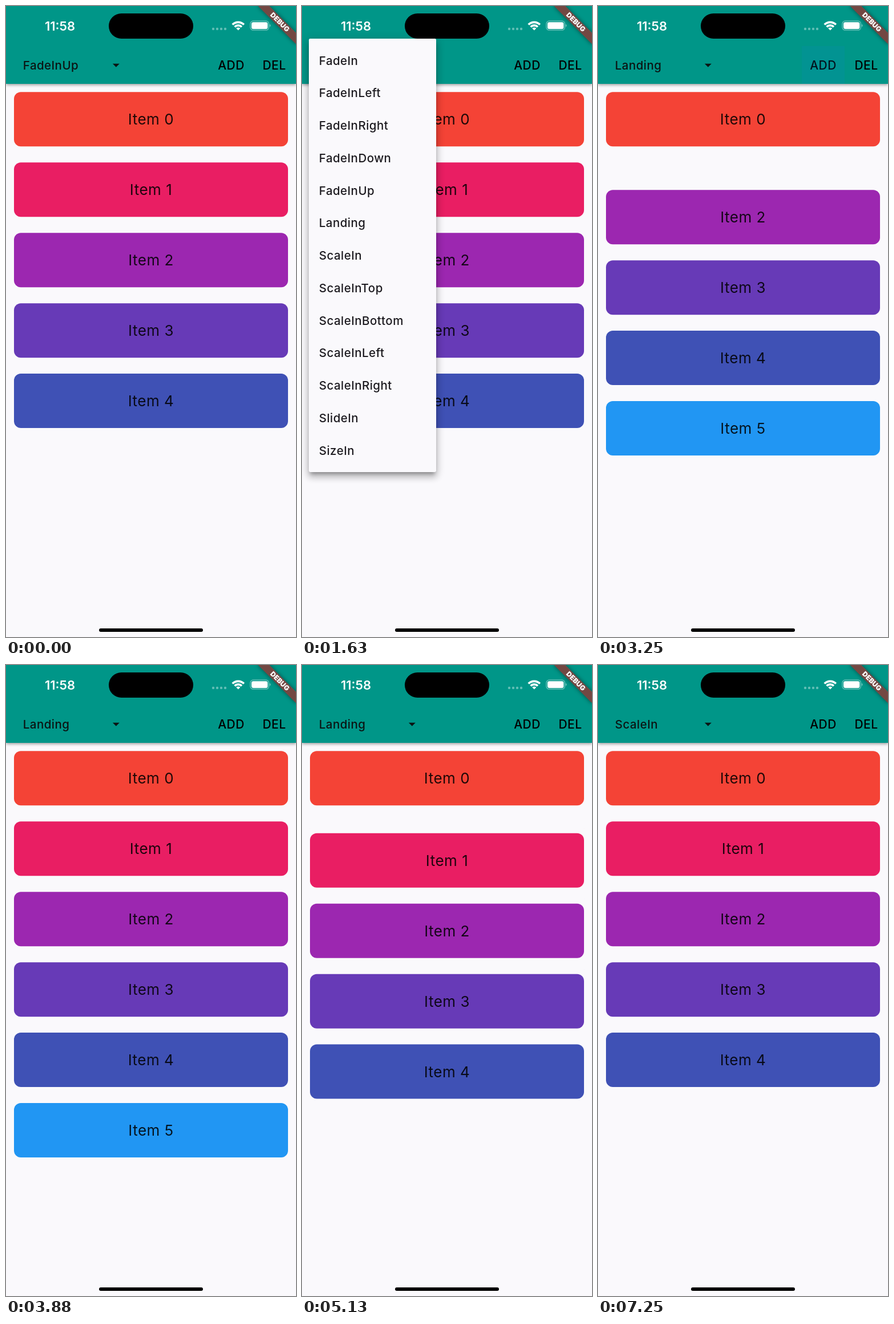
Write an HTML page that moves like this. It is 508 px wide and 1102 px high and loops after 8000 ms.

```html
<!DOCTYPE html>
<html lang="en">
<head>
<meta charset="utf-8">
<title>Animated list</title>
<style>
html, body { margin: 0; width: 100%; height: 100%; overflow: hidden; }
#stage {
  position: relative; width: 508px; height: 1102px; overflow: hidden;
  background: #faf9fc; color: rgba(0, 0, 0, .87);
  font-family: Inter, Roboto, sans-serif;
}
#stage div { position: absolute; box-sizing: border-box; white-space: nowrap; }

.card {
  left: 14.2px; top: 0; width: 479.6px; height: 94.5px; border-radius: 12px;
  font-size: 26px; letter-spacing: .5px; line-height: 95px; text-align: center;
}
#slot { left: 14.2px; top: 259px; width: 479.6px; height: 123px; overflow: hidden; }
#slot .card { left: 0; top: 14.2px; }

#bar {
  left: 0; top: 0; width: 508px; height: 136px; background: #009688;
  box-shadow: 0 2px 5px rgba(0, 0, 0, .38);
}
#label, .option { font-size: 20.5px; font-weight: 500; letter-spacing: .45px; }
#label { left: 29.8px; top: 84px; line-height: 40px; color: #0b1413; }
.button {
  top: 70px; height: 66px; line-height: 67px; text-align: center; color: #000;
  font-size: 21px; font-weight: 500; letter-spacing: .5px;
}
.ink { inset: 0; background: rgba(16, 130, 200, .15); }
#add { left: 357px; width: 75px; }
#del { left: 435px; width: 70px; }
#clock { left: 68px; top: 15px; line-height: 40px; font-size: 22px; font-weight: 600; color: #fff; }
#island { left: 180px; top: 13px; width: 148px; height: 44px; border-radius: 22px; background: #000; }
#stage svg { position: absolute; left: 0; top: 0; }
#home { left: 163px; top: 1086.5px; width: 182px; height: 6px; border-radius: 3px; background: #000; }

#menu { left: 11.8px; top: 56.5px; width: 223.4px; height: 757px; }
#panel {
  left: 0; width: 100%; border-radius: 2.4px; background: #faf9fc;
  box-shadow: 0 6px 6px -3px rgba(0, 0, 0, .26), 0 9px 12px 1px rgba(0, 0, 0, .17),
    0 3px 16px 2px rgba(0, 0, 0, .14);
}
.option {
  left: 0; width: 100%; height: 56.75px; padding-left: 18px;
  line-height: 57px; color: #1d1b20;
}

#banner {
  left: 460.7px; top: 33.1px; width: 94.6px; height: 14.2px;
  background: rgba(183, 28, 28, .63); box-shadow: 0 0 7px rgba(0, 0, 0, .5);
  color: #fff; font-size: 12px; font-weight: 900; line-height: 14.4px; text-align: center;
}
#corner { left: 508px; top: 0; width: 0; height: 0; transform: rotate(45deg); }
#corner #banner { left: -47.3px; }
</style>
</head>
<body>
<div id="stage">
  <div id="slot"></div>
  <div id="bar">
    <div id="label"></div>
    <div id="add" class="button"><div class="ink"></div>ADD</div>
    <div id="del" class="button"><div class="ink"></div>DEL</div>
    <div id="clock">11:58</div>
    <div id="island"></div>
    <svg width="508" height="136" fill="#fff">
      <path d="M186.8 100.8h12l-6 6z" fill="#0b1413"/>
      <path d="M363 40h24" stroke="#fff" stroke-opacity=".38" stroke-width="4.4"
        stroke-linecap="round" stroke-dasharray="0 7"/>
      <g fill="none" stroke="#fff" stroke-width="3.6">
        <path d="M396.7 32.5a14.2 14.2 0 0 1 20.1 0"/>
        <path d="M400.6 36.4a8.7 8.7 0 0 1 12.3 0"/>
      </g>
      <path d="M406.8 42.5l-3.6-3.5a5 5 0 0 1 7.2 0z"/>
      <rect x="428" y="26.2" width="32.4" height="16" rx="5" fill="none"
        stroke="#fff" stroke-opacity=".45" stroke-width="1.3"/>
      <rect x="430" y="28.2" width="28.4" height="12" rx="3.2"/>
      <path d="M462 31.6q3 2.6 0 5.2z" fill-opacity=".5"/>
    </svg>
  </div>
  <div id="menu"><div id="panel"></div></div>
  <div id="home"></div>
  <div id="corner"><div id="banner">DEBUG</div></div>
</div>
<script>
const LOOP = 8000, STEP = 125;   // the picture is held for each step
const TOP = 150.3, PITCH = 122.95, ROW = 56.75, PAD = 10.1, MENU_H = 757;
const colors = ['#f44336', '#e91e63', '#9c27b0', '#673ab7', '#3f51b5', '#2196f3'];
const names = ['FadeIn', 'FadeInLeft', 'FadeInRight', 'FadeInDown', 'FadeInUp', 'Landing', 'ScaleIn',
  'ScaleInTop', 'ScaleInBottom', 'ScaleInLeft', 'ScaleInRight', 'SlideIn', 'SizeIn'];

const insert = { start: 3133, grown: 3433, land: 3460, end: 3760 };
const remove = { start: 4575, gone: 4875, end: 5175 };
const menus = [
  { open: 1240, tap: 2375, close: 2450, from: 4, to: 5 },
  { open: 5615, tap: 7000, close: 7075, from: 5, to: 6 },
];

const $ = id => document.getElementById(id);
const ramp = (t, a, b) => Math.min(1, Math.max(0, (t - a) / (b - a)));
const mix = (a, b, p) => a + (b - a) * p;

function addDiv(parent, className, text, before = null) {
  const div = document.createElement('div');
  div.className = className;
  div.textContent = text;
  return parent.insertBefore(div, before);
}

function addCard(parent, i, before) {
  const card = addDiv(parent, 'card', 'Item ' + i, before);
  card.style.background = colors[i];
  return card;
}

const cards = colors.map((_, i) => addCard($('stage'), i, $('slot')));
const guest = addCard($('slot'), 1);
const options = names.map((name, i) => {
  const option = addDiv($('menu'), 'option', name);
  option.style.top = PAD + i * ROW + 'px';
  return option;
});

function drawList(t) {
  const inserting = t >= insert.start && t < insert.end;
  const removing = t >= remove.start && t < remove.end;
  const count = t >= insert.start && t < remove.start ? 6 : 5;
  const gap = inserting ? ramp(t, insert.start, insert.grown) - 1
    : removing ? 1 - ramp(t, remove.gone, remove.end) : 0;

  cards.forEach((card, i) => {
    const moves = i >= (inserting ? 2 : 1);
    card.style.transform = `translateY(${TOP + (i + (moves ? gap : 0)) * PITCH}px)`;
    card.style.visibility = i < count && !(inserting && i === 1) ? 'visible' : 'hidden';
  });

  const shown = inserting ? ramp(t, insert.land, insert.end)
    : removing ? 1 - ramp(t, remove.start, remove.gone) : 0;
  guest.style.opacity = shown;
  guest.style.transform = `scale(${mix(1.5, 1, shown)})`;
}

function drawMenu(t) {
  const m = menus.find(m => t >= m.open && t < m.close + 75);
  $('menu').style.visibility = m ? 'visible' : 'hidden';
  if (!m) return;

  const p = ramp(t, m.open, m.open + 300);
  const grow = ramp(p, .25, .5);
  const row = PAD + m.from * ROW;
  const top = mix(row, 0, grow);
  $('panel').style.top = top + 'px';
  $('panel').style.height = mix(row + ROW, MENU_H, grow) - top + 'px';
  $('menu').style.opacity = ramp(p, 0, .25) * (1 - ramp(t, m.close, m.close + 75));

  const unit = .5 / (names.length + 1.5);
  options.forEach((option, i) => {
    const start = .5 + (i + 1) * unit;
    option.style.opacity = i === m.from ? 1 : ramp(p, start, start + 1.5 * unit);
    option.style.background = i === m.to && t >= m.tap ? 'rgba(0, 0, 0, .07)' : 'none';
  });
}

function drawBar(t) {
  const picked = menus.filter(m => t >= m.close).pop();
  $('label').textContent = names[picked ? picked.to : menus[0].from];
  const press = (id, at) => {
    $(id).firstChild.style.opacity = ramp(t, at - 125, at + 125) * (1 - ramp(t, at + 125, at + 375));
  };
  press('add', 3125);
  press('del', 4500);
}

const begin = performance.now();
function frame() {
  const t = Math.floor((performance.now() - begin) % LOOP / STEP) * STEP;
  drawList(t);
  drawMenu(t);
  drawBar(t);
  requestAnimationFrame(frame);
}
frame();
</script>
</body>
</html>
```
